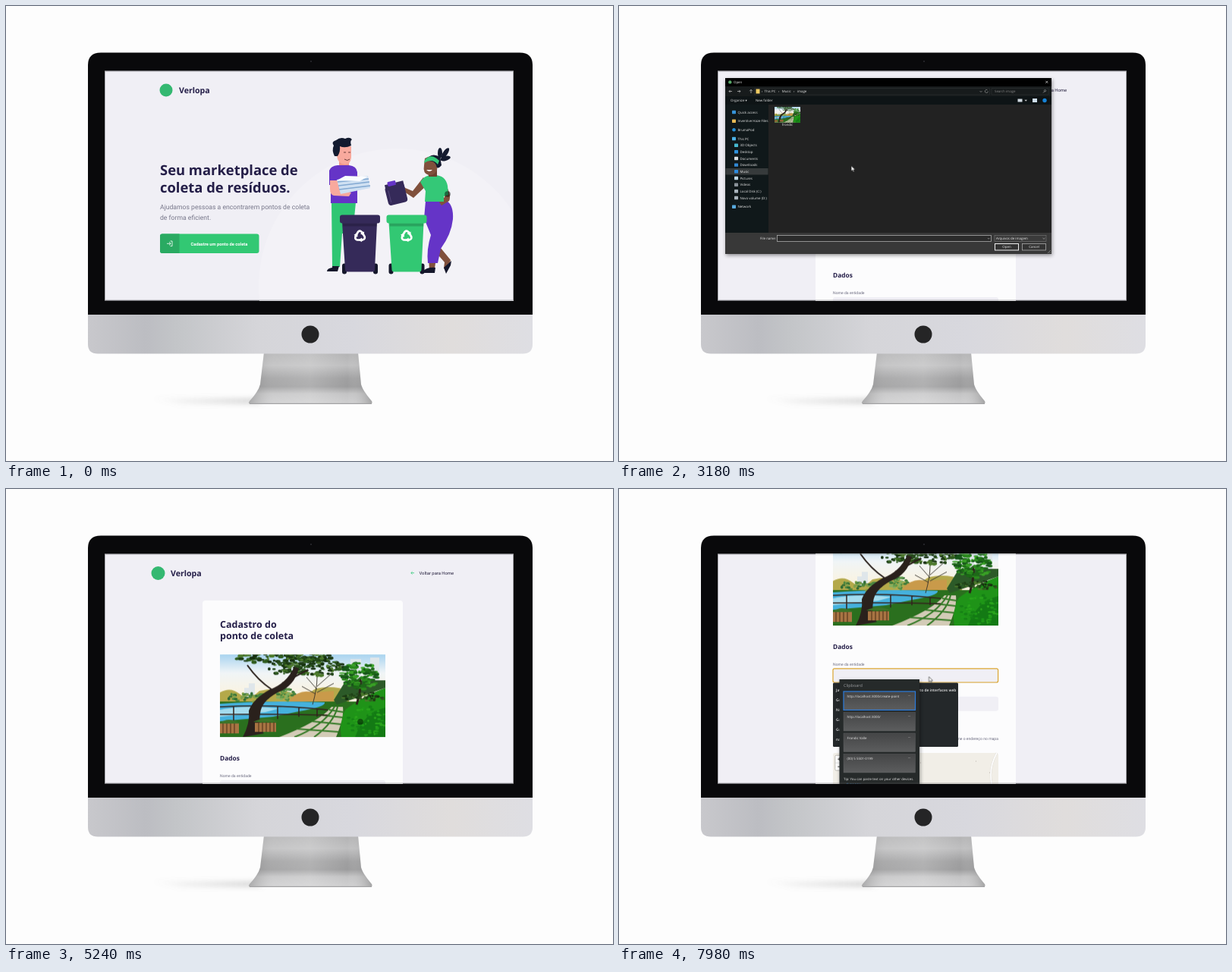
An HTML page for the animation above (8000 ms loop, 800 by 600 pixels).

```html
<!DOCTYPE html>
<html lang="pt">
<head>
<meta charset="utf-8">
<title>Ponto de coleta</title>
<style>
html, body { margin: 0; width: 100%; height: 100%; overflow: hidden; background: #fdfdfd }
svg { display: block; width: 800px; height: 600px }
text { font-family: Roboto, sans-serif; text-rendering: geometricPrecision; white-space: pre }
.title text, text.title { font-family: "Noto Sans", sans-serif; font-weight: 700; fill: #241e48 }
.label { font-size: 5.1px; fill: #6c6c80 }
.os text { font-family: "Open Sans", sans-serif; font-size: 4.4px; fill: #e8e8e8 }

.home, .form, .dialog, .photo, .hover, .picked, .dot, .arrow, .focus, .caret { animation: 8s step-end infinite }
.home { animation-name: home }
.form { animation-name: form }
.photo { animation-name: photo }
.hover { animation-name: hover }
.picked { animation-name: picked }
.arrow { animation-name: arrow }
.dot { animation-name: dot }
.caret { animation-name: caret }
.focus { animation-name: focus }
.dialog { animation-name: dialog; animation-timing-function: linear }
.list { animation: list 8s linear infinite }
.clip { animation: clip 8s ease-out infinite }
.scroll { animation: scroll 8s linear infinite }
.cursor { animation: cursor 8s ease-in-out infinite }

@keyframes home { 0% { opacity: 1 } 23.75%, 100% { opacity: 0 } }
@keyframes form { 0% { opacity: 0 } 23.75%, 100% { opacity: 1 } }
@keyframes photo { 0% { opacity: 0 } 61.25%, 100% { opacity: 1 } }
@keyframes hover { 0% { opacity: 0 } 45.5%, 100% { opacity: 1 } }
@keyframes picked { 0% { opacity: 0 } 50%, 100% { opacity: 1 } }
@keyframes focus { 0% { opacity: 0 } 90.5%, 100% { opacity: 1 } }
@keyframes caret { 0% { opacity: 0 } 90.5% { opacity: 1 } 96.75%, 100% { opacity: 0 } }
@keyframes arrow { 0% { opacity: 0 } 36% { opacity: 1 } 60% { opacity: 0 } 98.5%, 100% { opacity: 1 } }
@keyframes dot { 0% { opacity: 1 } 36% { opacity: 0 } 60% { opacity: 1 } 98.5%, 100% { opacity: 0 } }
@keyframes dialog { 0%, 34.75% { opacity: 0 } 36%, 60% { opacity: 1 } 61%, 100% { opacity: 0 } }
@keyframes list { 0%, 90.5% { opacity: 0 } 92%, 100% { opacity: 1 } }
@keyframes clip {
  0%, 98.5% { opacity: 0; transform: translateY(24px) }
  99.7%, 100% { opacity: 1; transform: none }
}
@keyframes scroll {
  0%, 73% { transform: none }
  75.75% { transform: translateY(-74px) }
  78.75% { transform: translateY(-144px) }
  80%, 100% { transform: translateY(-147px) }
}
@keyframes cursor {
  0%, 6.25% { transform: translate(582px, 248px) }
  7%, 9.25% { transform: translate(582px, 259px) }
  18.25%, 23.75% { transform: translate(285px, 314px); animation-timing-function: ease-in }
  30.5% { transform: translate(361px, 274px); animation-timing-function: ease-out }
  32.75%, 34.75% { transform: translate(385px, 270px) }
  44.75% { transform: translate(228px, 152px) }
  47.75%, 51.25% { transform: translate(223.5px, 147.5px) }
  58.75%, 60% { transform: translate(508px, 316px) }
  65.5% { transform: translate(467px, 307px) }
  71.25% { transform: translate(535px, 266px); animation-timing-function: linear }
  75.75% { transform: translate(550.5px, 248px); animation-timing-function: linear }
  78.75% { transform: translate(553px, 183px) }
  85.75%, 100% { transform: translate(408.5px, 247.5px) }
}
</style>
</head>
<body>
<svg viewBox="0 0 800 600">
<defs>
  <linearGradient id="chin">
    <stop offset="0" stop-color="#c8c8cc"/><stop offset=".13" stop-color="#bcbdc2"/>
    <stop offset=".2" stop-color="#c3c5c8"/><stop offset=".38" stop-color="#d5d5d9"/>
    <stop offset=".6" stop-color="#d8d8de"/><stop offset=".82" stop-color="#e0dddc"/>
    <stop offset="1" stop-color="#dedee3"/>
  </linearGradient>
  <linearGradient id="stand" x2="0" y2="1">
    <stop offset="0" stop-color="#b3b3b4"/><stop offset=".25" stop-color="#bfbfc0"/>
    <stop offset=".5" stop-color="#a0a0a1"/><stop offset=".66" stop-color="#9c9c9d"/>
    <stop offset=".8" stop-color="#c4c4c5"/><stop offset="1" stop-color="#d0d0d1"/>
  </linearGradient>
  <linearGradient id="edges">
    <stop offset="0" stop-color="#555" stop-opacity=".3"/><stop offset=".2" stop-color="#fff" stop-opacity=".12"/>
    <stop offset=".5" stop-color="#fff" stop-opacity=".2"/><stop offset=".8" stop-color="#fff" stop-opacity="0"/>
    <stop offset="1" stop-color="#555" stop-opacity=".35"/>
  </linearGradient>
  <linearGradient id="cast">
    <stop offset="0" stop-color="#888" stop-opacity="0"/><stop offset="1" stop-color="#888" stop-opacity=".32"/>
  </linearGradient>
  <linearGradient id="sky" x2="0" y2="1">
    <stop offset="0" stop-color="#a9d4f0"/><stop offset=".22" stop-color="#f0f5f7"/>
    <stop offset=".5" stop-color="#fbf3df"/>
  </linearGradient>
  <linearGradient id="card" x2="0" y2="1">
    <stop offset="0" stop-color="#444546"/><stop offset="1" stop-color="#5c5d5e"/>
  </linearGradient>
  <filter id="blur" x="-20%" y="-200%" width="140%" height="500%"><feGaussianBlur stdDeviation="5 3"/></filter>
  <filter id="shade" x="-5%" y="-5%" width="110%" height="112%"><feDropShadow dx="1" dy="2" stdDeviation="2.5" flood-opacity=".4"/></filter>
  <clipPath id="screen"><rect x="130" y="85.5" width="539" height="303"/></clipPath>
  <clipPath id="frame"><rect width="218" height="109"/></clipPath>

  <g id="arm">
    <path d="M-6.2 .6L-2.4-5.8Q0-8 2.2-5.6L3-4.3" fill="none" stroke="#fff" stroke-width="2.7"/>
    <path d="M.4-3.3L5.6-6 5.4-.6Z" fill="#fff"/>
  </g>
  <g id="recycle">
    <use href="#arm"/><use href="#arm" transform="rotate(120)"/><use href="#arm" transform="rotate(240)"/>
  </g>
  <g id="bin">
    <rect x="3" y="64" width="6" height="14" rx="3" fill="#15172b"/>
    <rect x="44" y="64" width="6" height="14" rx="3" fill="#15172b"/>
    <path d="M3 10H49L46 72Q46 75 43 75H10Q7 75 7 72Z"/>
    <path d="M4 11H49L48.7 15H4.2Z" fill="#000" opacity=".18"/>
    <rect width="53" height="11" rx="3"/>
    <use href="#recycle" x="26.5" y="28"/>
  </g>

  <g id="park" clip-path="url(#frame)">
    <rect width="218" height="109" fill="url(#sky)"/>
    <path d="M32 62V44H38V38H46V62ZM172 40V6H186V40ZM198 45V4H210V45Z" fill="#dfe6ea"/>
    <path d="M0 64V50Q14 42 26 52T52 48Q75 42 92 50T126 45Q150 40 170 48V66Z" fill="#b4a94a"/>
    <path d="M92 60Q105 45 122 50L150 48V64H92Z" fill="#c99a4a"/>
    <rect y="62" width="218" height="47" fill="#2a6f1e"/>
    <path d="M0 65Q60 60 138 63Q140 69 104 75L70 82 0 88Z" fill="#45b1dd"/>
    <path d="M0 73Q30 66 78 71L60 76 0 82Z" fill="#a4dcee"/>
    <path d="M218 44Q190 54 166 72Q156 86 160 109H218Z" fill="#1f9318"/>
    <path d="M218 70Q190 76 178 109H218Z" fill="#137a14"/>
    <path d="M147 69H162Q164 82 153 109H78Q132 88 147 69Z" fill="#d3cbb7"/>
    <path d="M144 73L163 76M135 80L162 83M121 88L160 92M101 98L156 102M155 69Q150 90 124 109M151 69Q136 94 98 109" stroke="#347a26" stroke-width="2" fill="none"/>
    <path d="M154 66Q190 54 218 44V34H166L150 60Z" fill="#2c5a28"/>
    <path d="M122 66Q128 45 128 30M128 46L114 30M128 42L146 26M128 50L150 38M126 52L108 42" stroke="#34322a" stroke-width=".9" fill="none"/>
    <path d="M180 66Q186 50 185 30" stroke="#2b2317" stroke-width="3" fill="none"/>
    <g id="leaves"></g>
    <path d="M0 69Q70 65 142 73M0 79Q70 78 142 80M18 68V88M48 68V87M76 69V85M104 70V82M128 71V82" stroke="#33231d" stroke-width="1.5" fill="none"/>
    <path d="M30 109Q40 90 38 74Q44 58 66 46Q88 38 98 16L104 18Q98 42 76 50Q54 62 53 78Q50 96 58 104Z" fill="#2a211c"/>
    <path d="M68 46Q50 34 36 14M82 38L116 20" stroke="#2a211c" stroke-width="2" fill="none"/>
    <path d="M0 91H25V104H0ZM46 90H74V102H46Z" fill="#a87443"/>
    <path d="M4 90V104M9 90V104M14 90V104M19 90V104M51 89V102M56 89V102M61 89V102M66 89V102M71 89V102" stroke="#59391f" stroke-width="1.2"/>
    <path d="M0 91Q10 81 27 91ZM44 89Q60 80 76 89Z" fill="#3d7328"/>
  </g>
</defs>

<rect width="800" height="600" fill="#fdfdfd"/>
<path d="M190 517H335V525H230Z" fill="url(#cast)" filter="url(#blur)"/>
<g id="foot">
  <path d="M340 457H464L468 499Q470 507 482 521Q484 525 478 525H324Q318 525 321 521Q333 508 335 499Z" fill="url(#stand)"/>
  <path d="M340 457H464L468 499Q470 507 482 521Q484 525 478 525H324Q318 525 321 521Q333 508 335 499Z" fill="url(#edges)"/>
</g>
<path d="M321 524.3H482" stroke="#a2a2a4" stroke-width="1.3"/>
<path d="M108 407H694V446Q694 458.5 681 458.5H121Q108 458.5 108 446Z" fill="url(#chin)"/>
<path d="M108 407V78Q108 61.5 125 61.5H677Q694 61.5 694 78V407Z" fill="#09090b"/>
<circle cx="402" cy="73" r="1.1" fill="#2b2b30"/>
<circle cx="401" cy="433" r="11.5" fill="#252526"/>

<g clip-path="url(#screen)">
  <rect x="130" y="85" width="539" height="304" fill="#f0eff5"/>
  <g class="home">
    <circle cx="515" cy="370" r="182" fill="#f3f2f7"/>
    <circle cx="211" cy="111" r="8.5" fill="#34b871"/>
    <g class="title">
      <text x="228" y="115" font-size="10.6">Verlopa</text>
      <text x="203" y="223" font-size="18.4">Seu marketplace de</text>
      <text x="203" y="246" font-size="18.4">coleta de resíduos.</text>
    </g>
    <g font-size="8.65" fill="#77778a">
      <text x="203" y="268.2">Ajudamos pessoas a encontrarem pontos de coleta</text>
      <text x="203" y="282">de forma eficient.</text>
    </g>
    <rect x="203" y="300.5" width="130.5" height="25.5" rx="3" fill="#32c873"/>
    <path d="M206 300.5H228.5V326H206Q203 326 203 323V303.5Q203 300.5 206 300.5Z" fill="#2aaa62"/>
    <path d="M212 313.3H217M215 311.2L217.2 313.3 215 315.4M216.5 310H219V316.6H216.5" fill="none" stroke="#fff" stroke-width=".8"/>
    <text x="243.5" y="315.7" font-size="5.8" font-weight="700" fill="#fff">Cadastre um ponto de coleta</text>

    <!-- man -->
    <path d="M429 259H461L457 300H443L440 344H430Z" fill="#2fc673"/>
    <path d="M430 343H439L437 350H423Q423 346 430 345Z" fill="#15172b"/>
    <path d="M439 202H452V213H439Z" fill="#ee9689"/>
    <path d="M435 185H455V200Q454 209 447 209Q438 209 436 198Z" fill="#f8a99d"/>
    <path d="M433 198Q429 190 432 184Q428 179 435 177Q441 172 447 175Q453 172 456 176Q453 178 455 184Q447 188 440 185Q441 192 437 198Z" fill="#121a2f"/>
    <path d="M445 193H448M451 193H454M446 202Q450 205 453 202" fill="none" stroke="#5b302f" stroke-width=".9"/>
    <path d="M426 217Q428 211 437 210H452Q462 211 463 219V260H428V236H426Z" fill="#6534c7"/>
    <path d="M427 230H438L439 241 455 246 452 251 432 250Q427 249 427 241Z" fill="#f8a99d"/>
    <path d="M463 224L475 227V233L463 231Z" fill="#f8a99d"/>
    <path d="M436 229L477 224 480 240 441 248Z" fill="#cfe0f2"/>
    <path d="M437 232L478 228M438 237L479 232M439 242L480 237" stroke="#83a9d2" stroke-width="1.5"/>
    <path d="M436 230L447 224 477 225 466 231Z" fill="#fafcff"/>

    <!-- woman -->
    <path d="M572 318L586 335 581 348 577 346 578 338 564 322ZM557 332H567L565 346 558 347Z" fill="#80503c"/>
    <path d="M577 345L587 336 586 342 580 353ZM549 350Q555 344 566 345L565 352H549Z" fill="#15172b"/>
    <path d="M553 257H581Q590 263 589 281Q587 301 573 320L569 339H556Q554 321 560 302L551 280Z" fill="#6534c7"/>
    <path d="M550 226L557 234 537 253 522 243 524 239 536 244Z" fill="#80503c"/>
    <path d="M576 230Q588 248 584 257L574 263 571 259 578 252Z" fill="#80503c"/>
    <path d="M546 232Q552 222 563 223Q579 222 582 237L583 249 577 251V258H552L553 244Z" fill="#34c877"/>
    <path d="M557 215H568V225H557Z" fill="#6c412f"/>
    <path d="M552 201Q561 195 570 202L568 216Q565 224 557 223Q549 221 551 210Z" fill="#80503c"/>
    <path d="M553 204Q560 192 572 199L574 210Q568 217 567 210Q565 203 553 204Z" fill="#141a2f"/>
    <path d="M552 203Q560 193 571 204L569 209Q562 200 551 207Z" fill="#34c877"/>
    <g fill="#141a2f">
      <ellipse cx="572" cy="194" rx="3" ry="7"/>
      <ellipse cx="579" cy="194" rx="3" ry="8" transform="rotate(34 579 194)"/>
      <ellipse cx="579" cy="201" rx="3" ry="7" transform="rotate(75 579 201)"/>
    </g>
    <path d="M554 216Q558 220 562 216Z" fill="#fff"/>
    <g transform="rotate(-14 514 247)">
      <path d="M502 235H525V245" fill="none" stroke="#352a59" stroke-width="4"/>
      <rect x="501" y="236" width="26" height="25" rx="4" fill="#352a59"/>
      <rect x="506" y="230" width="11" height="6" rx="1.5" fill="#6534c7"/>
      <path d="M505 241V257" stroke="#55487c" stroke-width="1"/>
    </g>
    <use href="#bin" x="440" y="275.5" fill="#352a59"/>
    <use href="#bin" x="501.5" y="275.5" fill="#32c873"/>
  </g>

  <g class="form">
    <g class="scroll">
      <circle cx="200.5" cy="111" r="9" fill="#34b871"/>
      <text class="title" x="217" y="115" font-size="10.6">Verlopa</text>
      <path d="M538 110.7H533.8M535.6 109L533.8 110.7 535.6 112.4" fill="none" stroke="#34cb79" stroke-width=".8"/>
      <text x="544.5" y="112.8" font-size="5.85" fill="#26213f">Voltar para Home</text>
      <rect x="259" y="147" width="264" height="800" rx="4" fill="#fcfcfd"/>
      <g class="title">
        <text x="282" y="183" font-size="12.5">Cadastro do</text>
        <text x="282" y="198.3" font-size="12.5">ponto de coleta</text>
        <text x="282" y="358.2" font-size="8.4">Dados</text>
        <text x="282" y="478.4" font-size="8.4">Endereço</text>
      </g>
      <rect x="282" y="218.5" width="218" height="108.5" rx="4" fill="#def5e9"/>
      <rect x="292.5" y="229.5" width="196.5" height="87.5" rx="4" fill="none" stroke="#55c48c" stroke-width=".8" stroke-dasharray="2 1.3"/>
      <path d="M387.3 269V271.5H393.7V269M390.5 269.5V264.5M388.5 266.3L390.5 264.3 392.5 266.3" fill="none" stroke="#34cb79"/>
      <text x="390.6" y="280.8" font-size="5.75" fill="#444" text-anchor="middle">Imagem do estabelecimento</text>
      <g class="photo"><use href="#park" x="282" y="218.3"/></g>
      <g class="label">
        <text x="282" y="379.5">Nome da entidade</text>
        <text x="282" y="416">E-mail</text>
        <text x="395" y="416">Falabrix</text>
        <text x="500" y="477.5" text-anchor="end">Selecione o endereço no mapa</text>
      </g>
      <g fill="#f0eff5">
        <rect x="282" y="384" width="218" height="19" rx="3"/>
        <rect x="282" y="420.7" width="104" height="19" rx="3"/>
        <rect x="395" y="420.7" width="105" height="19" rx="3"/>
      </g>
      <rect x="282" y="495" width="218" height="130" rx="3" fill="#f1eee7"/>
      <g fill="none">
        <path id="roads" d="M330 495Q336 515 332 532T340 570M388 495Q384 515 386 535T378 580M498 495Q487 515 491 535T486 580" stroke="#d9d6d0" stroke-width="2.4"/>
        <path d="M330 495Q336 515 332 532T340 570M388 495Q384 515 386 535T378 580M498 495Q487 515 491 535T486 580" stroke="#fff" stroke-width="1.6"/>
        <path d="M370 511h1M397 508h1M470 506h1M488 521h1" stroke="#b7b2aa"/>
      </g>
      <rect x="284.8" y="498.2" width="11" height="20" rx="1.5" fill="#fff" stroke="#bbb8b2"/>
      <path d="M285 508.2H296" stroke="#ccc" stroke-width=".6"/>
      <path d="M288.3 503.2H292.3M290.3 501.2V505.2M288.3 513.2H292.3" stroke="#222" stroke-width=".9"/>
    </g>

    <g class="focus">
      <rect x="282" y="236.8" width="217.6" height="18.2" rx="2" fill="none" stroke="#dba52f" stroke-width="1.2"/>
      <rect class="caret" x="290" y="243" width=".8" height="7" fill="#222"/>
    </g>
    <g class="list os" id="list"><rect x="282" y="255.5" width="165" height="84.5" rx="1.5" fill="#24282a"/></g>
  </g>

  <g class="dialog os">
    <g filter="url(#shade)"><rect x="140" y="95" width="430" height="232" fill="#202020"/></g>
    <rect x="140" y="95" width="430" height="11" fill="#000"/>
    <rect x="140" y="106" width="430" height="13" fill="#171b1c"/>
    <rect x="140" y="119" width="430" height="11" fill="#0e1416"/>
    <rect x="140" y="130" width="57" height="169" fill="#10181a"/>
    <rect x="140" y="299" width="430" height="28" fill="#383838"/>
    <circle cx="146.3" cy="100.4" r="2.2" fill="#58a868"/>
    <text x="151" y="102">Open</text>
    <path d="M562.3 98.8L565.3 101.8M565.3 98.8L562.3 101.8" stroke="#eee" stroke-width=".7"/>
    <path d="M149 112.5H145M146.6 110.9L145 112.5 146.6 114.1M156 112.5H160M158.4 110.9L160 112.5 158.4 114.1M174 115V110.5M172.2 112.2L174 110.3 175.8 112.2" fill="none" stroke="#ccc" stroke-width=".7"/>
    <path d="M178.5 108.5H488.5V117H178.5ZM491 108.5H566V117H491Z" fill="none" stroke="#34383a" stroke-width=".5"/>
    <rect x="180.5" y="109.5" width="5" height="6" fill="#efcb62"/>
    <text x="188" y="114.1">›  This PC   ›   Music   ›   image</text>
    <path d="M475.5 112L477 113.5 478.5 112M485.5 110.8A2 2 0 1 0 486.3 112.5" fill="none" stroke="#aaa" stroke-width=".6"/>
    <text x="495" y="114.1" style="fill:#858585">Search image</text>
    <path d="M559 114.5L561 112.5" stroke="#aaa" stroke-width=".7"/>
    <circle cx="561.5" cy="111.7" r="1.2" fill="none" stroke="#aaa" stroke-width=".6"/>
    <text x="147" y="126">Organize ▾</text>
    <text x="180" y="126">New folder</text>
    <rect x="525.5" y="122.5" width="6" height="4" fill="#cfd8df"/>
    <path d="M534.5 123.7H538L536.2 125.7Z" fill="#ccc"/>
    <rect x="545" y="122" width="6" height="5" fill="#cfe0ef"/>
    <circle cx="561" cy="124.5" r="2.7" fill="#1683d8"/>
    <rect x="140.5" y="214" width="56" height="8.5" fill="#363a3b"/>
    <g id="side"></g>
    <rect class="hover" x="203" y="132" width="38" height="28.5" fill="#555"/>
    <use href="#park" transform="translate(205 133) scale(.156 .19)"/>
    <text x="222" y="158.3" text-anchor="middle">frondic</text>
    <text x="207" y="308.2" text-anchor="end">File name:</text>
    <rect x="208.5" y="302.5" width="282" height="8" fill="#2b2b2b" stroke="#aaa" stroke-width=".8"/>
    <text class="picked" x="211" y="308.2">frondic</text>
    <rect x="495" y="302.5" width="68" height="8" fill="#3b3b3b" stroke="#777" stroke-width=".6"/>
    <text x="497" y="308.2">Arquivos de imagem</text>
    <path d="M486 306L487.3 307.3 488.6 306M558.5 306L560 307.3 561.5 306" fill="none" stroke="#bbb" stroke-width=".6"/>
    <rect x="495.5" y="313.5" width="31" height="8.5" fill="#333" stroke="#eee"/>
    <rect x="531.5" y="313.5" width="31" height="8.5" fill="#333" stroke="#aaa" stroke-width=".8"/>
    <text x="511" y="319.4" text-anchor="middle">Open</text>
    <text x="547" y="319.4" text-anchor="middle">Cancel</text>
    <path d="M565 326L569 322M567.5 326L569 324.5" stroke="#999" stroke-width=".7"/>
  </g>

  <g class="clip os" id="clip">
    <g filter="url(#shade)"><rect x="290.5" y="251" width="105.5" height="165" fill="#25292c"/></g>
    <text x="296" y="260.6" style="font-size:5.5px;fill:#9a9c9e">Clipboard</text>
  </g>

  <g class="cursor">
    <circle class="dot" r="3.8" fill="#000" fill-opacity=".46" stroke="#000" stroke-opacity=".1" stroke-width=".8"/>
    <path class="arrow" d="M0 0V7L1.6 5.5 2.7 8 3.9 7.5 2.8 5.1H5Z" fill="#fff" stroke="#222" stroke-width=".6"/>
  </g>
  <rect x="130.5" y="86" width="538" height="302" fill="none" stroke="#55555a" stroke-opacity=".45"/>
</g>
</svg>
<script>
const svgNS = "http://www.w3.org/2000/svg";

function add(parent, tag, attrs, text = "") {
  const node = document.createElementNS(svgNS, tag);
  for (const key in attrs) node.setAttribute(key, attrs[key]);
  node.textContent = text;
  return parent.appendChild(node);
}
const byId = id => document.getElementById(id);

let seed = 7;
const random = () => (seed = seed * 16807 % 2147483647) / 2147483647;

// Scatters small leaves over an ellipse
function foliage(cx, cy, rx, ry, count, size, colors) {
  for (let i = 0; i < count; i++) {
    const angle = random() * Math.PI * 2, reach = Math.sqrt(random());
    add(byId("leaves"), "ellipse", {
      cx: cx + Math.cos(angle) * reach * rx, cy: cy + Math.sin(angle) * reach * ry,
      rx: size * (0.6 + random()), ry: size * (0.4 + random() * 0.5), fill: colors[i % colors.length]
    });
  }
}
const dark = ["#16300f", "#24481a", "#2f5c1f", "#1c3a14", "#4d7a2c"];
const bright = ["#2a8a1d", "#1d6a17", "#39a026", "#17561a"];
foliage(34, 57, 30, 6, 40, 2.5, ["#4b8740", "#7fa04a", "#2f6b34"]);
foliage(86, 54, 14, 9, 40, 2, ["#5f9a4a", "#3c7a3a", "#86b060"]);
foliage(86, 4, 66, 8, 130, 2.6, dark);
foliage(124, 16, 40, 13, 120, 2.4, dark);
foliage(84, 18, 24, 9, 50, 2.2, dark);
foliage(185, 28, 25, 18, 130, 2.6, bright);
foliage(190, 56, 28, 6, 50, 2, dark);
foliage(194, 88, 26, 20, 70, 2, ["#1f9a18", "#2aa51c", "#158015"]);

// Each entry: label, centre y, icon colour, indent
[
  ["Quick access", 140, "#3693d8", 0], ["Inventive Haze Files", 151.7, "#e8b954", 0],
  ["BrumaPod", 163.3, "#248ed6", 0], ["This PC", 175, "#4db2e8", 0],
  ["3D Objects", 183.7, "#46b9cf", 1], ["Desktop", 192.3, "#2d91dc", 1],
  ["Documents", 201, "#d7dde0", 1], ["Downloads", 209.6, "#3187d3", 1],
  ["Music", 218.3, "#2c8ce0", 1], ["Pictures", 227, "#bdd6e3", 1],
  ["Videos", 235.7, "#8a929a", 1], ["Local Disk (C:)", 244.3, "#a9b4bc", 1],
  ["Novo volume (D:)", 253, "#a9b4bc", 1], ["Network", 264.7, "#58a9dd", 0]
].forEach(([label, y, fill, indent]) => {
  const x = 149 + indent * 3;
  if (label === "BrumaPod") add(byId("side"), "circle", { cx: x + 2.5, cy: y, r: 2.3, fill });
  else add(byId("side"), "rect", { x, y: y - 2.2, width: 5, height: 4.4, rx: 0.6, fill });
  add(byId("side"), "text", { x: x + 7.5, y: y + 1.6 }, label);
});

["Javascript, protótipos rápidos e desenvolvimento de interfaces web", "Gestão de resíduos", "Nova coleta",
  "Galpão verde", "Guia de coleta", "natureza"].forEach((label, i) =>
  add(byId("list"), "text", { x: 286, y: 267 + i * 13, "font-weight": 600, style: "font-size:4.9px" }, label));

["http://localhost:3000/create-point", "http://localhost:3000/", "Frondic Valle", "(00) 5 5501-0199"].forEach((label, i) => {
  const y = 267 + i * 27.5, clip = byId("clip");
  add(clip, "rect", { x: 296, y, width: 94.5, height: 24.5, fill: "url(#card)", stroke: i ? "#626466" : "#2c7cdc", "stroke-width": i ? 0.4 : 1.2 });
  add(clip, "text", { x: 300.5, y: y + 7.8 }, label);
  add(clip, "text", { x: 381, y: y + 6.5 }, "···");
});
add(byId("clip"), "text", { x: 296, y: 383.5 }, "Tip: You can paste text on your other devices.");
add(byId("clip"), "text", { x: 300, y: 390.8, style: "fill:#4b9ae8" }, "Sync now");
</script>
</body>
</html>
```
